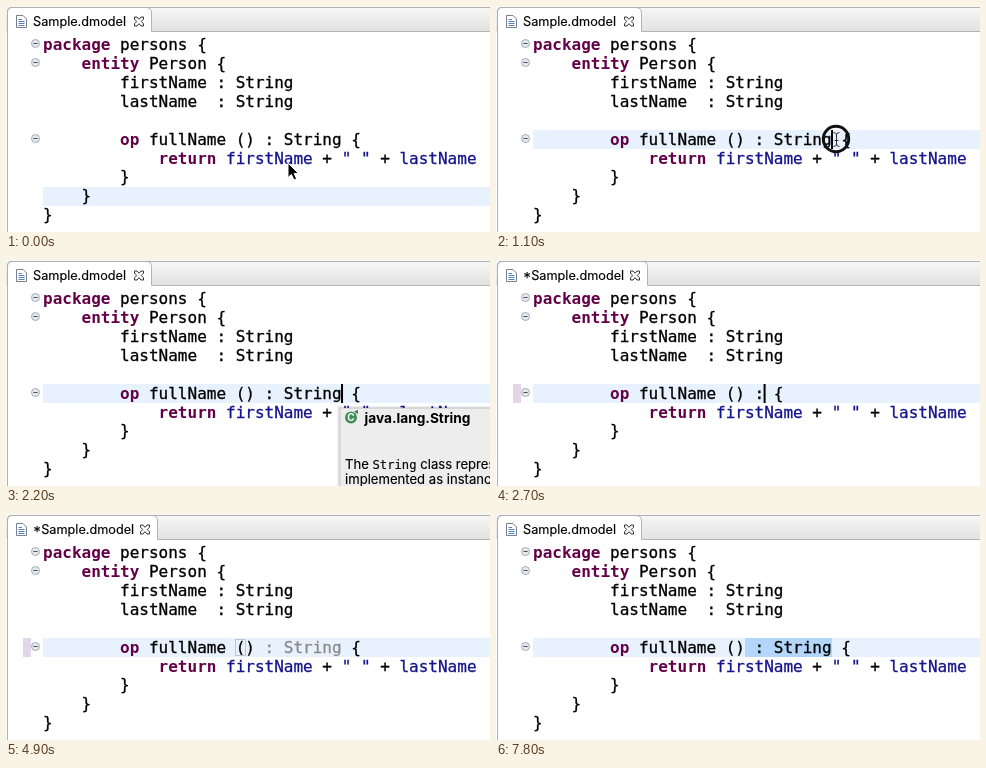
Write an HTML page that moves like this. It is 484x226 px and loops after 8 s.

```html
<!DOCTYPE html>
<html lang="en">
<meta charset="utf-8">
<title>Editor</title>
<style>
  html, body { margin: 0; width: 100%; height: 100%; overflow: hidden; background: #fff; }
  svg { display: block; }
  text { white-space: pre; }
  .code { font: 16px "DejaVu Sans Mono", monospace; stroke: #000; stroke-width: .3px; }
  .ui { font: 12.7px Inter, sans-serif; stroke: #000; stroke-width: .15px; }
  .key { font-weight: bold; fill: #640048; stroke: none; }
  .name { fill: #14148c; stroke: #14148c; }
  .hint { fill: #8a8a8a; stroke: #8a8a8a; }
  #popup .ui { font-size: 13.1px; }
</style>
<svg width="484" height="226" viewBox="0 0 484 226">
  <defs>
    <linearGradient id="bar" x2="0" y2="1">
      <stop stop-color="#f8f8f8"/><stop offset="1" stop-color="#e2e2e2"/>
    </linearGradient>
    <g id="fold">
      <circle r="4" fill="#e6eaee" stroke="#a3adb5"/>
      <path d="M-2.2 0H2.2" stroke="#4a555e"/>
    </g>
  </defs>

  <rect width="484" height="226" fill="#fff"/>
  <rect width="484" height="25" fill="url(#bar)"/>
  <path id="tab" fill="#fff" stroke="#b4b4b4"/>
  <path d="M484 1.5H6Q1.5 1.5 1.5 6V226" fill="none" stroke="#b0b0b0"/>
  <path d="M10.5 9.5H17L20.5 13V21.5H10.5Z" fill="#fff" stroke="#77808c"/>
  <path d="M12.5 13.5H16M12.5 15.5H18.5M12.5 17.5H18.5M12.5 19.5H18.5" stroke="#5580ba"/>
  <text id="title" class="ui" x="27" y="20"></text>
  <path id="close" d="M-4.5-4.5H-2L0-2.2L2-4.5H4.5V-2.3L2.3 0L4.5 2.3V4.5H2L0 2.2L-2 4.5H-4.5V2.3L-2.3 0L-4.5-2.3Z" fill="#fff" stroke="#333"/>

  <rect id="line" x="37" width="447" height="19" fill="#e8f2fe"/>
  <rect id="marker" x="17" y="124" width="8" height="19" fill="#e3d6e8"/>
  <rect id="selection" x="249" y="124" width="87" height="19" fill="#b4d6fb"/>
  <use href="#fold" x="29.5" y="37.5"/>
  <use href="#fold" x="29.5" y="56.5"/>
  <use href="#fold" x="29.5" y="132.5"/>

  <g class="code">
    <text x="37" y="44"><tspan class="key">package</tspan> persons {</text>
    <text x="37" y="63">    <tspan class="key">entity</tspan> Person {</text>
    <text x="37" y="82">        firstName : String</text>
    <text x="37" y="101">        lastName  : String</text>
    <text x="37" y="139">        <tspan class="key">op</tspan> fullName ()<tspan id="type"></tspan><tspan id="hint" class="hint"> : String</tspan> {</text>
    <text x="37" y="158">            <tspan class="key">return</tspan> <tspan class="name">firstName</tspan> + <tspan class="name">" "</tspan> + <tspan class="name">lastName</tspan></text>
    <text x="37" y="176">        }</text>
    <text x="37" y="195">    }</text>
    <text x="37" y="214">}</text>
  </g>
  <rect id="bracket" x="229.5" y="125.5" width="10" height="16" fill="none" stroke="#c4c4c4"/>
  <rect id="caret" y="124" width="2" height="19"/>

  <g id="popup">
    <rect x="331" y="146" width="160" height="90" opacity=".06"/>
    <rect x="332.5" y="147" width="160" height="90" opacity=".1"/>
    <rect x="334.5" y="148.5" width="160" height="90" fill="#ededed" stroke="#d6d6d6"/>
    <circle cx="345" cy="157.5" r="6" fill="#3f8f58"/>
    <text x="345" y="161" text-anchor="middle" fill="#fff" style="font:bold 10px Inter,sans-serif">C</text>
    <path d="M348 151.5l4-1.5v4z" fill="#3a7a4d"/>
    <text x="358.5" y="163" style="font:bold 13.7px Inter,sans-serif">java.lang.String</text>
    <text class="ui" x="339" y="209">The <tspan style="font:12.2px 'DejaVu Sans Mono',monospace">String</tspan> class represents</text>
    <text class="ui" x="339" y="224">implemented as instances</text>
  </g>

  <path id="arrow" d="M0 0V14.5L3.4 11.4L6 17L8.6 15.8L6.1 10.4H10.4Z" stroke="#fff"/>
  <g id="beam" fill="none">
    <path d="M337.5 126.5Q340.5 126.5 340.5 129V138Q340.5 140.5 337.5 140.5M343.5 126.5Q340.5 126.5 340.5 129V138Q340.5 140.5 343.5 140.5M338.5 134.5H342.5" stroke="#333"/>
    <circle id="ring" cx="340" cy="133" r="12.7" stroke="#111" stroke-width="3"/>
  </g>
</svg>
<script>
  const LOOP = 8000, BLINK = 535, CHAR = 9.633;
  const CLICK = 1000, HOVER = 2080, ERASE = 2220, KEY = 65, UNDO = 6150, SAVED = 6700;
  const TYPE = ' : String', ERASED = ERASE + KEY * TYPE.length;
  const $ = id => document.getElementById(id);
  const show = (id, on) => $(id).style.display = on ? '' : 'none';
  const within = (t, from, to) => t >= from && t < to;

  function draw(t) {
    const undone = t >= UNDO;
    const removed = undone ? 0 : Math.max(0, Math.min(TYPE.length, Math.floor((t - ERASE) / KEY)));
    const left = TYPE.length - removed;
    const dirty = removed > 0;

    $('type').textContent = TYPE.slice(0, left);
    show('hint', within(t, 3200, SAVED));
    show('bracket', within(t, ERASED, UNDO));
    show('selection', undone);
    show('marker', within(t, ERASE + KEY, SAVED));
    $('line').setAttribute('y', t < CLICK ? 181 : 124);

    $('title').textContent = (dirty ? '*' : '') + 'Sample.dmodel';
    const end = dirty ? 6 : 0;
    $('close').setAttribute('transform', `translate(${133 + end} 15.5)`);
    $('tab').setAttribute('d', `M1.5 25.5V6Q1.5 1.5 6 1.5H${140 + end}Q${145.5 + end} 1.5 ${145.5 + end} 7V25.5H484`);

    // The caret restarts its blink after every edit.
    const edit = undone ? UNDO : dirty ? ERASE + KEY * removed : CLICK;
    show('caret', t >= CLICK && Math.floor((t - edit) / BLINK) % 2 === 0);
    $('caret').setAttribute('x', 37 + CHAR * (22 + left) - 0.6);

    show('popup', within(t, HOVER, ERASE + KEY));
    const p = Math.max(0, Math.min(1, (t - 100) / 800)), ease = p * p * (3 - 2 * p);
    show('arrow', t < CLICK);
    $('arrow').setAttribute('transform', `translate(${282 + 58 * ease} ${157 - 24 * ease})`);
    show('beam', within(t, CLICK, HOVER));
    show('ring', t < 1300);
  }

  function tick() {
    draw(performance.now() % LOOP);
    requestAnimationFrame(tick);
  }
  tick();
</script>
</html>
```
